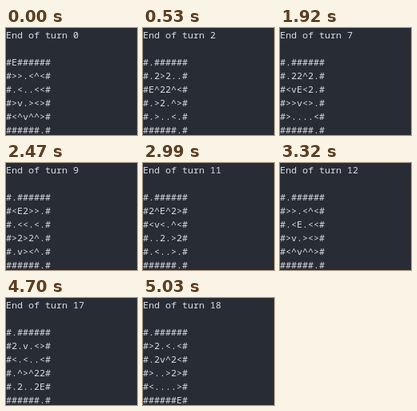
An HTML page for the animation above (5300 ms loop, 164 by 134 pixels).

```html
<!DOCTYPE html>
<html lang="en">
<head>
<meta charset="utf-8">
<title>Blizzard valley</title>
<style>
  html, body { margin: 0; width: 100%; height: 100%; overflow: hidden; background: #282c34; }
  pre {
    margin: 0;
    color: #dcdfe4;
    font: 11.667px/17px "Noto Sans Mono", monospace;
    font-variant-ligatures: none;
  }
</style>
</head>
<body>
<pre id="screen"></pre>
<script>
const LOOP = 5300;
const turnStarts = [0, 270, 530, 860, 1120, 1380, 1650, 1920, 2200, 2470,
  2730, 2990, 3320, 3580, 3840, 4170, 4440, 4700, 5030];
const valley = [">>.<^<", ".<..<<", ">v.><>", "<^v^^>"];
const moves = "DDWURRDLURWDDRRRDD";
const steps = { U: [0, -1], D: [0, 1], L: [-1, 0], R: [1, 0], W: [0, 0] };
const winds = { "^": steps.U, "v": steps.D, "<": steps.L, ">": steps.R };
const width = valley[0].length, height = valley.length;
const wrap = (n, size) => ((n % size) + size) % size;

function render(turn) {
  const grid = valley.map(row => [..."." .repeat(row.length)]);
  valley.forEach((row, y) => [...row].forEach((wind, x) => {
    if (wind === ".") return;
    const [dx, dy] = winds[wind];
    const line = grid[wrap(y + dy * turn, height)];
    const col = wrap(x + dx * turn, width);
    const cell = line[col];
    line[col] = cell === "." ? wind : String((+cell || 1) + 1);
  }));

  const rows = [
    [..."#.######"],
    ...grid.map(cells => ["#", ...cells, "#"]),
    [..."######.#"],
  ];
  let x = 1, y = 0;
  for (const move of moves.slice(0, turn)) {
    x += steps[move][0];
    y += steps[move][1];
  }
  rows[y][x] = "E";
  return `End of turn ${turn}\n\n` + rows.map(row => row.join("")).join("\n");
}

const screen = document.getElementById("screen");
let shown = -1;

function draw() {
  const time = performance.now() % LOOP;
  const turn = turnStarts.filter(start => start <= time).length - 1;
  if (turn !== shown) screen.textContent = render(shown = turn);
  requestAnimationFrame(draw);
}
draw();
</script>
</body>
</html>
```
